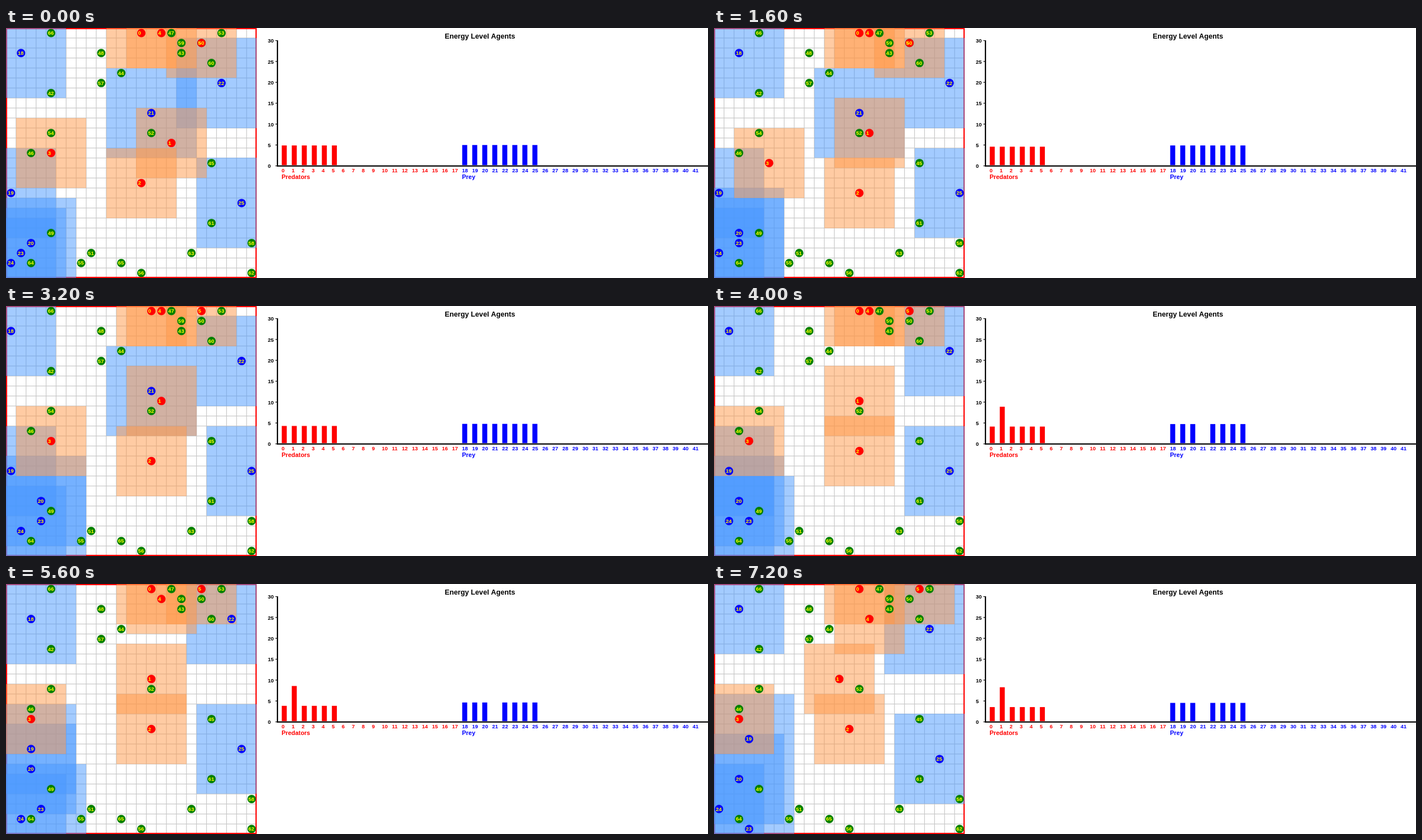
Recreate the animation shown at these times as an HTML page with a canvas. Size 1252 px wide and 447 px high, loop 8 s.

```html
<!DOCTYPE html>
<html lang="en">
<head>
<meta charset="utf-8">
<title>Energy Level Agents</title>
<style>
  html, body { margin: 0; width: 100%; height: 100%; overflow: hidden; background: #fff; }
  canvas { display: block; }
</style>
</head>
<body>
<canvas id="stage" width="1252" height="447"></canvas>
<script>
const ctx = document.getElementById('stage').getContext('2d');
const STEP = 800, STEPS = 10;
const CELLS = 25, SIZE = 447, CELL = SIZE / CELLS;
const RED = '#f00', BLUE = '#00f', GREEN = '#008000', YELLOW = '#ff0';
const MEAL_STEP = 5; // predator 1 eats prey 21

// Each agent: id, start column, start row, one letter per step.
const predators = [
  [0, 13, 0, 'R--------'],
  [1, 16, 11, 'UL-UL--LL'],
  [2, 13, 15, 'DR-UU--L-'],
  [3, 4, 12, 'RD-LLL---'],
  [4, 15, 0, '-----D-DD'],
  [5, 19, 1, '---U----R']
];
const prey = [
  [18, 1, 2, 'R-LLRDRU-'],
  [19, 0, 16, '----RR-RU'],
  [20, 2, 21, 'U-URLU-D-'],
  [21, 14, 8, 'UDDU'],
  [22, 21, 5, 'RRUDUULLD'],
  [23, 1, 22, 'RUR--D-DD'],
  [24, 0, 23, '-U-RUDDUL'],
  [25, 23, 17, 'URDUL--LD']
];
const FIRST_GRASS = 42;
const grass = [
  [4, 6], [17, 2], [11, 4], [20, 13], [2, 12], [16, 0], [9, 2], [4, 20], [19, 1],
  [8, 22], [14, 10], [21, 0], [4, 10], [7, 23], [13, 24], [9, 5], [24, 21], [17, 1],
  [20, 3], [20, 19], [24, 24], [18, 22], [2, 23], [11, 23], [4, 0]
].map(([col, row], i) => ({ id: FIRST_GRASS + i, col, row }));

const MOVES = { U: [0, -1], D: [0, 1], L: [-1, 0], R: [1, 0], '-': [0, 0] };

function place([id, col, row, path], step) {
  for (const move of path.slice(0, step)) {
    col += MOVES[move][0];
    row += MOVES[move][1];
  }
  return { id, col, row };
}

const center = n => (n + 0.5) * CELL;

function rect(x, y, w, h, color) {
  ctx.fillStyle = color;
  ctx.fillRect(x, y, w, h);
}

function label(text, x, y, size, color) {
  ctx.font = `bold ${size}px "Liberation Sans", Arial, sans-serif`;
  ctx.fillStyle = color;
  ctx.fillText(text, x, y);
}

function drawGrid() {
  for (let i = 1; i < CELLS; i++) {
    const p = i * CELL - 0.6;
    rect(p, 0, 1.2, SIZE, '#c8c8c8');
    rect(0, p, SIZE, 1.2, '#c8c8c8');
  }
  ctx.strokeStyle = RED;
  ctx.lineWidth = 2.2;
  ctx.strokeRect(1, 1, SIZE - 2, SIZE - 2);
}

function drawRange({ col, row }, reach, color) {
  const edge = n => Math.round(Math.max(0, Math.min(CELLS, n)) * CELL);
  const x = edge(col - reach), y = edge(row - reach);
  rect(x, y, edge(col + reach + 1) - x, edge(row + reach + 1) - y, color);
}

function drawDot({ col, row }, color) {
  ctx.fillStyle = color;
  ctx.beginPath();
  ctx.arc(center(col), center(row), 7.5, 0, 2 * Math.PI);
  ctx.fill();
}

function drawId({ id, col, row }) {
  label(id, center(col) - 5.8, center(row) + 3.3, 9.5, YELLOW);
}

const slotX = id => 491.5 + id * CELL;

function drawBar(id, energy, color) {
  const top = 246.2 - energy * 7.467;
  rect(slotX(id) + 0.3, top, 8.9, 245.2 - top, color);
}

function drawChart() {
  label('Energy Level Agents', 782.5, 19, 12.7, '#000');
  rect(483, 22, 2.2, 225.5, '#000');
  rect(483, 245.6, 769, 2.2, '#000');
  for (let v = 0; v <= 30; v += 5) {
    const y = 246.5 - v * 7.467;
    rect(480.5, y - 0.6, 3, 1.2, '#000');
    label(v, 467, y + 3.9, 9.5, '#000');
  }
  for (let id = 0; id <= 41; id++) {
    label(id, slotX(id), 257.5, 9.5, id < 18 ? RED : BLUE);
  }
  label('Predators', slotX(0), 270, 10.9, RED);
  label('Prey', slotX(18), 270, 10.9, BLUE);
}

function draw(step) {
  const hunters = predators.map(a => place(a, step));
  const hunted = prey.filter(a => step < MEAL_STEP || a[0] !== 21).map(a => place(a, step));

  rect(0, 0, 1252, SIZE, '#fff');
  drawGrid();
  hunted.forEach(a => drawRange(a, 4, 'rgba(72,152,255,0.5)'));
  hunters.forEach(a => drawRange(a, 3, 'rgba(255,152,72,0.5)'));
  grass.forEach(a => drawDot(a, GREEN));
  hunted.forEach(a => drawDot(a, BLUE));
  hunters.forEach(a => drawDot(a, RED));
  [...grass, ...hunted, ...hunters].forEach(drawId);

  drawChart();
  for (const { id } of hunters) {
    const meal = id === 1 && step >= MEAL_STEP ? 4.75 : 0;
    drawBar(id, 4.85 - 0.15 * step + meal, RED);
  }
  for (const { id } of hunted) drawBar(id, 4.95 - 0.05 * step, BLUE);
}

const start = performance.now();
function tick() {
  draw(Math.floor((performance.now() - start) / STEP) % STEPS);
  requestAnimationFrame(tick);
}
tick();
</script>
</body>
</html>
```
